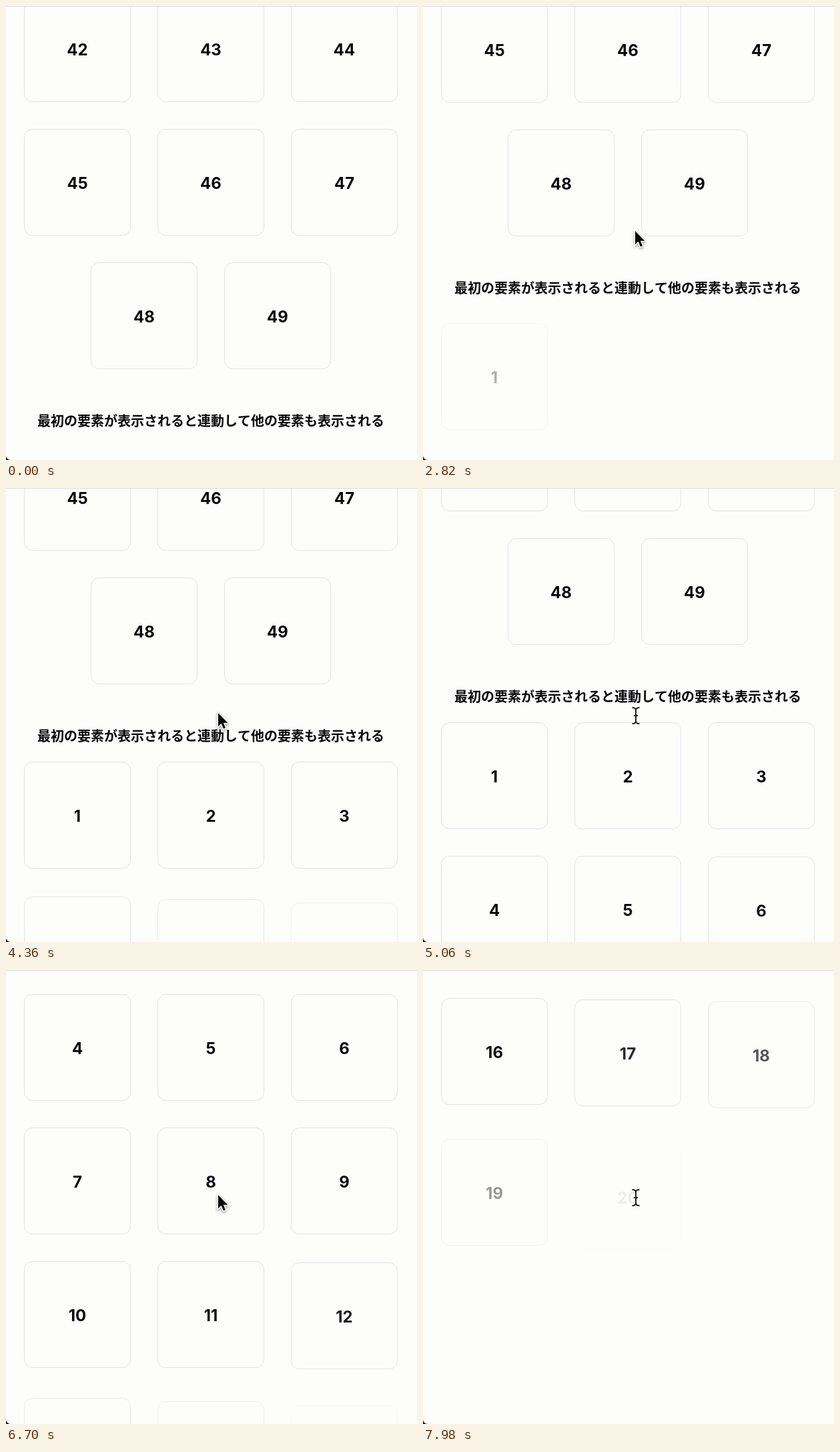
Animation of 616x680 px, one loop 8000 ms. Source, as an HTML page with a canvas:

```html
<!DOCTYPE html>
<html lang="ja">
<head>
<meta charset="utf-8">
<title>Staggered cards</title>
<style>
  html, body { margin: 0; width: 100%; height: 100%; overflow: hidden; background: #fdfdfc; }
  canvas { display: block; }
</style>
</head>
<body>
<canvas id="stage" width="616" height="680"></canvas>
<script>
const ctx = document.getElementById('stage').getContext('2d');
const W = 616, H = 680, LOOP = 8000;
const TITLE = '最初の要素が表示されると連動して他の要素も表示される';
const BG = '#fdfdfc', LINE = '#e2e2e6', INK = '#08080c';

// Scroll offset over ticks: [tick, pixels]
const scrollKeys = [[42, 0], [61, 199], [94, 250], [109, 309], [143, 824], [171, 1619]];
const slopes = scrollKeys.slice(1).map(([t, y], i) => (y - scrollKeys[i][1]) / (t - scrollKeys[i][0]));
const tangents = scrollKeys.map((_, i) => {
  if (i === 0) return 0;
  const a = slopes[i - 1], b = slopes[i];
  return b === undefined ? a * 1.1 : 2 * a * b / (a + b);
});

function scrollAt(tick) {
  if (tick <= scrollKeys[0][0]) return 0;
  let i = 0;
  while (i < slopes.length - 1 && tick > scrollKeys[i + 1][0]) i++;
  const [t0, y0] = scrollKeys[i], [t1, y1] = scrollKeys[i + 1];
  const d = t1 - t0, u = (tick - t0) / d, v = 1 - u;
  return Math.round(y0 * (1 + 2 * u) * v * v + y1 * u * u * (3 - 2 * u)
    + d * u * v * (tangents[i] * v - tangents[i + 1] * u));
}

// Ticks last 20, 100 and 20 ms in turn
function tickAt(ms) {
  const rest = ms % 140;
  return 3 * Math.floor(ms / 140) + (rest >= 20) + (rest >= 120);
}

function card(label, x, y, alpha = 1) {
  if (y > H || y < -170) return;
  ctx.globalAlpha = alpha;
  ctx.strokeStyle = LINE;
  ctx.lineWidth = 1;
  ctx.beginPath();
  ctx.roundRect(x + .5, y + .5, 159, 159, 12);
  ctx.stroke();
  ctx.fillStyle = INK;
  ctx.font = '700 24px Inter, "Liberation Sans", sans-serif';
  ctx.fillText(label, x + 80, y + 90);
  ctx.globalAlpha = 1;
}

function arrow(x, y) {
  ctx.save();
  ctx.translate(x, y);
  ctx.scale(1.22, 1.22);
  ctx.beginPath();
  for (const [px, py] of [[0, 0], [0, 16.5], [3.8, 13], [6.5, 19.3], [9, 18.2], [6.4, 12.1], [11.8, 12]]) ctx.lineTo(px, py);
  ctx.closePath();
  ctx.shadowColor = 'rgba(0,0,0,.4)';
  ctx.shadowBlur = 4;
  ctx.shadowOffsetY = 2;
  ctx.strokeStyle = '#fff';
  ctx.lineWidth = 2.2;
  ctx.stroke();
  ctx.shadowColor = 'transparent';
  ctx.fillStyle = '#060608';
  ctx.fill();
  ctx.restore();
}

function beam(x, y) {
  ctx.beginPath();
  for (const s of [-1, 1]) {
    ctx.moveTo(x - 5.5, y + 12 * s);
    ctx.quadraticCurveTo(x, y + 12 * s, x, y + 8 * s);
    ctx.quadraticCurveTo(x, y + 12 * s, x + 5.5, y + 12 * s);
  }
  ctx.moveTo(x, y - 9);
  ctx.lineTo(x, y + 9);
  ctx.moveTo(x - 3, y);
  ctx.lineTo(x + 3, y);
  for (const [color, width] of [['#fff', 4], ['#222224', 2]]) {
    ctx.strokeStyle = color;
    ctx.lineWidth = width;
    ctx.stroke();
  }
}

function pointer(tick, overText) {
  if (tick < 25) return;
  if (overText) return beam(319, 341);
  const far = Math.pow(1 - Math.min(1, (tick - 24) / 13), 2.5);
  const settle = Math.max(0, Math.min(1, (tick - 37) / 4));
  arrow(311 + 340 * far + 7 * settle, 340 + 380 * far - 3 * settle);
}

function frame() {
  ctx.fillStyle = BG;
  ctx.fillRect(0, 0, W, H);
  ctx.textAlign = 'center';

  const tick = tickAt(performance.now() % LOOP);
  const scroll = scrollAt(tick);

  for (let i = 0; i < 8; i++) {
    const row = Math.floor(i / 3);
    card(42 + i, 27 + i % 3 * 200 + (row === 2 ? 100 : 0), row * 200 - 16 - scroll);
  }

  const titleY = 621 - scroll;
  ctx.fillStyle = INK;
  ctx.font = '700 20px "Noto Sans CJK JP", "Noto Sans CJK", sans-serif';
  ctx.fillText(TITLE, 307, titleY + 8);
  let overText = titleY > 305 && titleY < 360;

  // Each card starts 6 ticks after the last, easing out over 30
  for (let i = 0; i < 20; i++) {
    const p = Math.min(1, (tick - 56 - 6 * i) / 30);
    if (p <= 0) break;
    const left = (1 - p) ** 2;
    const y = 660 + Math.floor(i / 3) * 200 - scroll + Math.round(20 * left);
    card(i + 1, 27 + i % 3 * 200, y, 1 - left);
    if (i > 8 && i % 3 === 1 && Math.abs(y + 81 - 338) < 14) overText = true;
  }

  // Window edge and corner
  ctx.fillStyle = '#dcdcda';
  ctx.fillRect(0, 0, W, 1);
  ctx.fillStyle = '#2a0a04';
  ctx.beginPath();
  ctx.moveTo(0, H - 7);
  ctx.arc(7, H - 7, 7, Math.PI, Math.PI / 2, true);
  ctx.lineTo(0, H);
  ctx.fill();

  pointer(tick, overText);
  requestAnimationFrame(frame);
}
frame();
</script>
</body>
</html>
```
